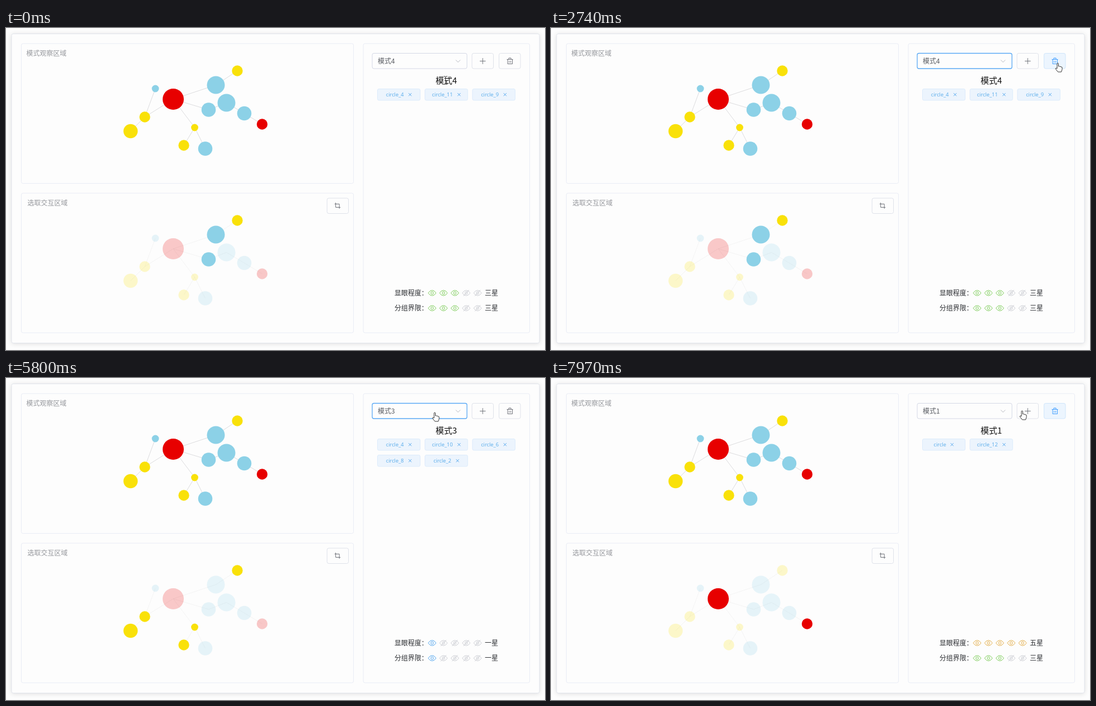
An HTML page that plays this animation: 967 by 579 pixels, repeating every 8 s.

```html
<!DOCTYPE html>
<html lang="zh-CN">
<head>
<meta charset="utf-8">
<style>
html, body { margin: 0; width: 100%; height: 100%; overflow: hidden; background: #fdfdfd; }
svg { display: block; font: 12px "Noto Sans CJK SC", "Noto Sans CJK", sans-serif; fill: none; }
.card { fill: #fdfdfd; stroke: #e1e4ec; filter: drop-shadow(0 1px 4px rgba(0,0,0,.12)); }
.panel { fill: #fdfdfd; stroke: #e9ecf5; }
.button { fill: #fdfdfd; stroke: #dfe2ea; }
.icon { stroke: #70737a; }
.active .button { fill: #ecf5fe; stroke: #cfe5fb; }
.active .icon { stroke: #409eff; }
.tag { fill: #ecf4fd; stroke: #dcebfb; }
.tag-text { fill: #55aaea; font: 9.3px "Open Sans", sans-serif; text-anchor: middle; }
.label { fill: #96989d; }
.dark { fill: #2b2d31; }
</style>
</head>
<body>
<svg id="stage" width="967" height="579" viewBox="0 0 967 579"></svg>
<script>
const LOOP = 8000;
const BLUE = '#8cd1e7', YELLOW = '#f9e109', RED = '#e70000';
const stage = document.getElementById('stage');

function add(parent, name, attrs = {}, text) {
  const el = document.createElementNS('http://www.w3.org/2000/svg', name);
  for (const key in attrs) el.setAttribute(key, attrs[key]);
  if (text !== undefined) el.textContent = text;
  return parent.appendChild(el);
}
const group = (parent, attrs) => add(parent, 'g', attrs);
const box = (parent, x, y, width, height, cls, rx = 3) =>
  add(parent, 'rect', { x, y, width, height, rx, class: cls });
const label = (parent, x, y, text, attrs) => add(parent, 'text', { x, y, ...attrs }, text);
const path = (parent, d, attrs) => add(parent, 'path', { d, ...attrs });

// Node index matches the number in its circle name: x, y, radius, colour
const nodes = [
  [300, 128, 19, RED], [268, 109, 6.4, BLUE], [249, 160, 9.7, YELLOW],
  [357.5, 217, 12.8, BLUE], [415, 77, 9.7, YELLOW], [395.5, 134.5, 16, BLUE],
  [223.5, 185.5, 12.8, YELLOW], [427.5, 153.5, 12.8, BLUE], [338.5, 179, 6.4, YELLOW],
  [363.5, 147, 12.8, BLUE], [319, 211, 9.7, YELLOW], [376.5, 102.5, 16, BLUE],
  [459.5, 173, 9.7, RED]
];
const edges = [[0, 11], [0, 9], [0, 8], [0, 2], [2, 1], [2, 6], [11, 4],
  [9, 5], [5, 7], [7, 12], [8, 10], [8, 3]];

const modes = {
  1: { nodes: [0, 12], stars: [5, 3] },
  2: { nodes: [1, 3, 5, 7, 9, 11], stars: [3, 3] },
  3: { nodes: [4, 10, 6, 8, 2], stars: [1, 1] },
  4: { nodes: [4, 11, 9], stars: [3, 3] }
};

// Interface state from each time on
const states = [
  { at: 0, mode: 4, list: 4, open: false, focus: '' },
  { at: 700, mode: 4, list: 4, open: true, focus: 'select' },
  { at: 1450, mode: 4, list: 4, open: false, focus: 'select' },
  { at: 2900, mode: 1, list: 3, open: false, focus: 'trash' },
  { at: 3900, mode: 1, list: 3, open: true, focus: 'select' },
  { at: 4620, mode: 3, list: 3, open: false, focus: 'select' },
  { at: 5950, mode: 3, list: 3, open: true, focus: 'select' },
  { at: 6600, mode: 2, list: 3, open: false, focus: 'select' },
  { at: 7580, mode: 1, list: 1, open: false, focus: 'trash' }
];
// Pointer stops: time, x, y
const stops = [[0, 784, 85], [500, 789, 62], [1600, 789, 62], [2400, 904, 62],
  [3100, 904, 62], [3800, 760, 62], [3950, 760, 62], [4400, 736, 157],
  [4750, 736, 157], [5450, 764, 61], [6020, 764, 61], [6350, 737, 134],
  [6750, 737, 134], [7350, 904, 60], [7680, 904, 60], [7970, 840, 58], [8000, 839, 58]];

function drawGraph(dy, dim) {
  const g = group(stage, { transform: `translate(0 ${dy})` });
  for (const [a, b] of edges) {
    const [x1, y1] = nodes[a], [x2, y2] = nodes[b];
    add(g, 'line', { x1, y1, x2, y2, stroke: '#d3d3d6', 'stroke-width': .8, opacity: dim ? .3 : 1 });
  }
  return nodes.map(([cx, cy, r, fill]) => add(g, 'circle', { cx, cy, r, fill }));
}

function drawEyes(y, count) {
  const colour = { 1: '#4da3ee', 3: '#7acb55', 5: '#e3ab43' }[count];
  for (let i = 0; i < 5; i++) {
    const on = i < count;
    const eye = group(ratings, {
      transform: `translate(${764.5 + i * 20.4} ${y})`, stroke: on ? colour : '#cbcdd3'
    });
    path(eye, 'M-7 0Q-4-4.8 0-4.8T7 0Q4 4.8 0 4.8T-7 0Z');
    add(eye, 'circle', { r: 2.3 });
    if (!on) path(eye, 'M5-5.5L-5 5.5');
  }
  label(ratings, 859, y + 4.5, ' 一二三四五'[count] + '星', { class: 'dark' });
}

function drawTags(list) {
  list.forEach((id, i) => {
    const name = id ? 'circle_' + id : 'circle';
    const g = group(tags, {
      transform: `translate(${666.5 + i % 3 * 85.2} ${109.5 + Math.floor(i / 3) * 29})`
    });
    box(g, 0, 0, 76.5, 20.5, 'tag', 2.5);
    label(g, 31.2, 13.8, name, { class: 'tag-text' });
    const x = 53 + (name.length - 6) * 2.7;
    path(g, `M${x - 2.6} 7.6l5.2 5.2m0-5.2l-5.2 5.2`, { stroke: '#55a8ee' });
  });
}

function drawMenu(state, hover) {
  const height = 10.5 + state.list * 29;
  const frame = add(menu, 'rect', { x: 657, y: 83.5, width: 171, height: height - .5, rx: 3,
    fill: '#fdfdfd', stroke: '#e4e7ed', style: 'filter:drop-shadow(0 1px 4px rgba(0,0,0,.12))' });
  path(menu, 'M736.5 84L741.5 79L746.5 84', { fill: '#fdfdfd', stroke: '#e8ebf1' });
  for (let i = 1; i <= state.list; i++) {
    const y = 60.3 + i * 29;
    if (i === hover) add(menu, 'rect', { x: 657.5, y, width: 170, height: 29, fill: '#f2f5fc' });
    label(menu, 674, y + 19, '模式' + i, { fill: i === state.mode ? '#409eff' : '#505358' });
  }
}

box(stage, 10, 10.5, 947, 556, 'card');
box(stage, 27.5, 28, 596, 251.5, 'panel');
box(stage, 27.5, 297, 596, 251, 'panel');
box(stage, 641, 28, 298.5, 520, 'panel');
label(stage, 36.5, 50.2, '模式观察区域', { class: 'label' });
label(stage, 38.5, 319.2, '选取交互区域', { class: 'label' });
drawGraph(0, false);
const lowerNodes = drawGraph(269, true);

box(stage, 576, 306, 38.5, 27.5, 'button');
path(stage, 'M591.5 314v8.5h8.5M589.5 316.5h8.5v8.5', { class: 'icon' });

const select = box(stage, 657, 45.5, 170, 27.5, '');
select.setAttribute('fill', '#fdfdfd');
const value = label(stage, 667, 64.2, '');
const chevron = path(stage, 'M-4-2L0 2L4-2', { stroke: '#b5b8bf' });
const plus = group(stage);
box(plus, 836, 45.5, 38.5, 27.5, 'button');
path(plus, 'M850 59.5h10.5M855.3 54.2v10.6', { class: 'icon' });
const trash = group(stage);
box(trash, 884.5, 45.5, 38.5, 27.5, 'button');
path(trash, 'M898.5 56.5h11M902 56v-2h4v2M900 57v7.5h8.5V57M902.8 59v3.5M905.6 59v3.5', { class: 'icon' });

const title = label(stage, 790, 99.6, '', { 'font-size': 15, 'text-anchor': 'middle', fill: '#111' });
const tags = group(stage);
label(stage, 697, 481, '显眼程度：', { class: 'dark' });
label(stage, 697, 508.3, '分组界限：', { class: 'dark' });
const ratings = group(stage);
const menu = group(stage);

const pointer = group(stage, { stroke: '#333', 'stroke-linejoin': 'round' });
const shapes = {
  hand: path(pointer, 'M4 10V1.8Q5.2 0 6.4 1.8V7Q7.8 6 8.8 7.4Q10.2 6.6 11 8Q12.6 7.6 13 9V12.5L11.5 17H5.5L1 11.2Q1.5 8.8 4 11Z', { fill: '#fff' }),
  arrow: path(pointer, 'M4 0V13L7 10.2L9 15L11 14L9 9.5H13Z', { fill: '#fff' }),
  beam: path(pointer, 'M1 2H3.5L4.5 3L5.5 2H8M4.5 3V15M1 16H3.5L4.5 15L5.5 16H8')
};

function pointerAt(t) {
  const i = Math.max(1, stops.findIndex(s => s[0] > t));
  const [t0, x0, y0] = stops[i - 1], [t1, x1, y1] = stops[i];
  const p = (t - t0) / (t1 - t0), e = p * p * (3 - 2 * p);
  return [x0 + (x1 - x0) * e, y0 + (y1 - y0) * e];
}

let shown, shownMenu;
function showMode(state) {
  const mode = modes[state.mode];
  value.textContent = title.textContent = '模式' + state.mode;
  lowerNodes.forEach((el, i) => el.setAttribute('opacity', mode.nodes.includes(i) ? 1 : .21));
  tags.replaceChildren();
  drawTags(mode.nodes);
  ratings.replaceChildren();
  mode.stars.forEach((count, i) => drawEyes(476.5 + i * 27.3, count));
}

function render(t) {
  const index = states.findLastIndex(s => s.at <= t);
  const state = states[index];
  if (shown !== state.mode) showMode(state);
  shown = state.mode;

  const [x, y] = pointerAt(t), tipX = x + 4;
  const inBar = y < 73 && y > 45;
  const overSelect = inBar && tipX < 827;
  pointer.setAttribute('transform', `translate(${x} ${y})`);
  const kind = inBar || state.open ? 'hand' : t < 300 ? 'beam' : 'arrow';
  for (const key in shapes) shapes[key].style.display = key === kind ? '' : 'none';

  const focused = state.focus === 'select';
  select.setAttribute('stroke', focused ? '#5aa9f5' : overSelect ? '#c3c8d8' : '#d4d8e6');
  select.setAttribute('stroke-width', focused ? 1.3 : 1);
  value.setAttribute('fill', state.open ? '#a6a9af' : '#595c62');
  plus.setAttribute('class', inBar && tipX > 848 && tipX < 875 ? 'active' : '');
  trash.setAttribute('class', state.focus === 'trash' || inBar && tipX > 884 ? 'active' : '');

  // The menu unfolds from its top edge and fades with the chevron turn.
  const changed = index ? Math.min(1, (t - state.at) / 220) : 1;
  const wasOpen = index && states[index - 1].open;
  const ease = 1 - (1 - changed) ** 3;
  const amount = state.open ? ease : wasOpen ? 1 - ease : 0;
  chevron.setAttribute('transform', `translate(811 59.5) rotate(${180 * amount})`);
  menu.style.display = amount > .01 ? '' : 'none';
  menu.setAttribute('opacity', amount);
  menu.setAttribute('transform', `translate(0 ${83 * (1 - amount)}) scale(1 ${amount})`);
  if (amount > .01) {
    const row = Math.floor((y - 60.3) / 29);
    const hover = y > 89 && row <= state.list ? row : state.mode;
    const key = index + ':' + hover;
    if (key !== shownMenu) {
      menu.replaceChildren();
      drawMenu(state, hover);
      shownMenu = key;
    }
  }
}

const start = performance.now();
function tick() {
  render((performance.now() - start) % LOOP);
  requestAnimationFrame(tick);
}
tick();
</script>
</body>
</html>
```
